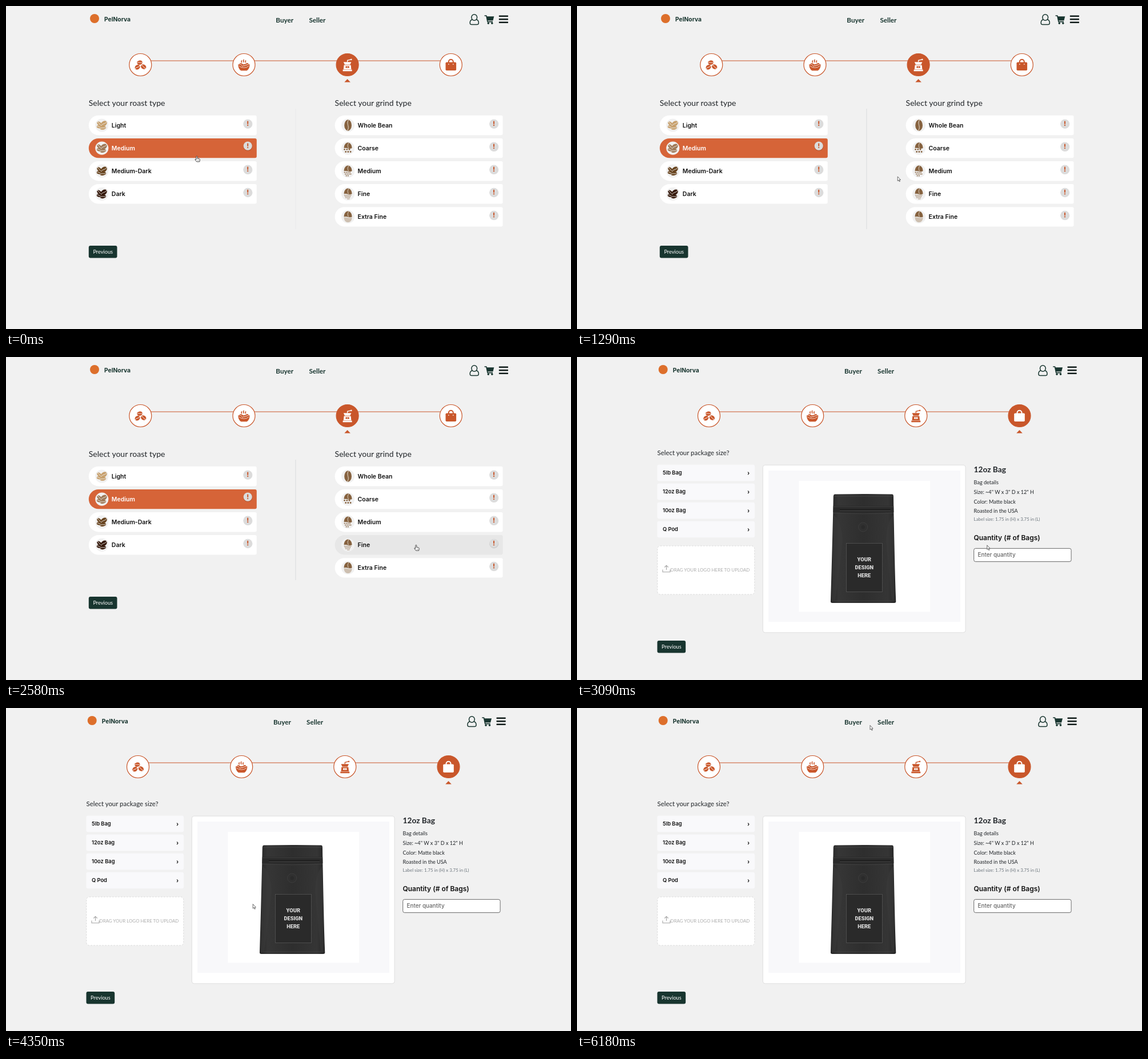
Write an HTML page that moves like this. It is 989 px wide and 566 px high and loops after 6.21 s.

```html
<!DOCTYPE html>
<html lang="en">
<head>
<meta charset="utf-8">
<title>Coffee order steps</title>
<style>
  html, body { margin: 0; width: 100%; height: 100%; overflow: hidden; background: #f1f1f1; }
  svg { display: block; width: 989px; height: 566px; }
  .lato { font-family: Lato, sans-serif; }
  .geo { font-family: Inter, sans-serif; }
  .heavy { font-family: Roboto, sans-serif; }
</style>
</head>
<body>
<svg id="stage" viewBox="0 0 989 566"></svg>
<script>
const LOOP = 6210, SWITCH = 2850, DIVIDER_IN = 330;
const ORANGE = '#c9572b', DARK = '#18352f', INK = '#212529';

const text = (x, y, size, str, o = {}) =>
  `<text class="${o.font || 'lato'}" x="${x}" y="${y}" font-size="${size}" font-weight="${o.weight || 400}"
    fill="${o.fill || INK}" text-anchor="${o.anchor || 'start'}">${str}</text>`;
const rect = (x, y, w, h, fill, r = 0, extra = '') =>
  `<rect x="${x}" y="${y}" width="${w}" height="${h}" rx="${r}" fill="${fill}" ${extra}/>`;
const circle = (x, y, r, fill, extra = '') =>
  `<circle cx="${x}" cy="${y}" r="${r}" fill="${fill}" ${extra}/>`;
const path = (d, fill, extra = '') => `<path d="${d}" fill="${fill}" ${extra}/>`;
const line = (d, color, w, extra = '') => path(d, 'none', `stroke="${color}" stroke-width="${w}" ${extra}`);
const at = (x, y, body) => `<g transform="translate(${x} ${y})">${body}</g>`;

function bean(x, y, rx, ry, angle, fill, gap = '#fff') {
  return `<g transform="translate(${x} ${y}) rotate(${angle})">
    <ellipse rx="${rx}" ry="${ry}" fill="${fill}"/>` +
    line(`M${-rx} 0C${-rx / 3} ${-ry * .6} ${rx / 3} ${ry * .6} ${rx} 0`, gap, .8) + '</g>';
}

const stepIcons = [
  c => bean(-5.2, 4, 4.9, 3.9, -35, c) + bean(-1.2, -4.2, 4.9, 3.8, -12, c) + bean(5.4, 3.2, 5, 3.9, 35, c),
  (c, gap) => path('M-10 -1.5Q-6 2.5 0 2.5Q6 2.5 10 -1.5C10.6 4 8 8 5 10H-5C-8 8 -10.6 4 -10 -1.5Z', c) +
    bean(-4.6, 0, 4.2, 2.8, 30, c, gap) + bean(4.6, 0, 4.2, 2.8, -30, c, gap) + bean(0, 1.4, 3.6, 2.6, -20, c, gap) +
    line('M-9 1.5Q-5 4.8 0 4.8T9 1.5', gap, .7) +
    line('M-3.5 -4Q-5.5 -6 -3.5 -8M0 -4.5Q-2 -7 0 -9.5M3.5 -4Q1.5 -6 3.5 -8', c, 1.4),
  (c, gap) => path('M-6.8 -5H6.8L4.6 -.6H-4.6ZM-6 .2H6L6.8 7.8H-6.8ZM-8 8.3H8V11H-8Z', c) +
    line('M0 -5V-8L6.5 -9.6', c, 1.3) + circle(6.8, -9.6, 1.2, c) +
    rect(-3.2, 2.2, 6.4, 3, gap, .5) + circle(0, 3.7, .7, c),
  c => rect(-9.3, -4.8, 18.6, 14.6, c, 1.8) +
    line('M-4 -2V-5.5A4 4 0 0 1 4 -5.5V-2', c, 2) +
    circle(-4, -1.3, .9, '#fff', 'opacity=".8"') + circle(4, -1.3, .9, '#fff', 'opacity=".8"')
];

function header(active) {
  const xs = [235.3, 416.5, 597.6, 778.8];
  const steps = xs.map((x, i) => {
    const on = i === active;
    const fg = on ? '#fff' : ORANGE, bg = on ? ORANGE : '#fff';
    return circle(x, 103, 19.5, bg, `stroke="${ORANGE}" stroke-width="1.2"`) + at(x, 103.3, stepIcons[i](fg, bg));
  }).join('');
  const ax = xs[active];
  return circle(155, 22, 8, '#dd6f2b') +
    text(172, 27.3, 10.3, 'PelNorva', { font: 'geo', weight: 700, fill: DARK }) +
    text(472.3, 29.2, 11.7, 'Buyer', { weight: 700, fill: DARK }) +
    text(530.4, 29.2, 11.7, 'Seller', { weight: 700, fill: DARK }) +
    line('M819.7 14.8A4.9 5.2 0 0 1 819.7 25.2A4.9 5.2 0 0 1 819.7 14.8M816 23.8C812.5 25 812 28 812.3 30.5Q812.5 32.5 815 32.5H824.5Q827 32.5 827.2 30.5C827.5 28 827 25 823.5 23.8', DARK, 1.5) +
    line('M837.5 17H840.8L843 27.6H852', DARK, 1.6) +
    path('M841 18.2H854.3L852.4 25.4H842.5Z', DARK) + circle(844.3, 30.3, 1.7, DARK) + circle(850.8, 30.3, 1.7, DARK) +
    [16.4, 21.9, 27.4].map(y => rect(862.8, y, 16.2, 2.5, '#111c1a', .6)).join('') +
    line(`M${xs[0]} 96H${xs[3]}`, ORANGE, 1.2) + steps +
    path(`M${ax - 5.3} 133.4L${ax} 128L${ax + 5.3} 133.4Z`, ORANGE);
}

const previous = (x, y) => rect(x, y, 49.7, 21.4, DARK, 3) +
  text(x + 24.9, y + 14.2, 9.2, 'Previous', { anchor: 'middle', fill: '#fff' });

const roastIcon = shade => () =>
  bean(-4.6, -3, 4.4, 2.9, 42, shade, '#f0f0f0') + bean(3.4, -2.6, 6.2, 4.3, -38, shade, '#f0f0f0') +
  bean(-4.8, 2.6, 4.4, 2.8, 12, shade, '#f0f0f0') + bean(2, 4.6, 5.6, 3.1, -12, shade, '#f0f0f0');

const BROWN = '#86623f';
const grounds = (step, r) => () => {
  let dots = '';
  for (let row = 0, y = 2.2; y < 9.6; y += step, row++)
    for (let x = -6 + (row % 2) * step / 2; x <= 6.2; x += step)
      if (x * x / 46 + y * y / 92 < 1) dots += circle(x.toFixed(1), y.toFixed(1), r, BROWN);
  return halfBean() + dots;
};
const halfBean = () => path('M-7 0C-7 -6 -3.5 -9.8 0 -9.8S7 -6 7 0Q3.5 1.6 0 .4T-7 0Z', BROWN) +
  line('M1.5 -9.5Q-2 -5 1 0', '#e6dccf', .9);
const powder = () => path('M-7 1Q-3.5 .6 0 1.6T7 1C7 6 4 9.6 0 9.6S-7 6 -7 1Z', '#cdbfb0') + halfBean();
const wholeBean = () => `<ellipse rx="6.4" ry="9.7" fill="${BROWN}"/>` +
  line('M1.2 -9.6C-4 -3 4 2 -1.2 9.6', '#efe6da', 1);

const ROW_W = 294, ROW_H = 34.4;
const rowY = i => 191.8 + i * 40.1;

function optionRow(x, i, label, icon, picked, id = '') {
  const y = rowY(i), mid = y + ROW_H / 2;
  const shape = `M${x + 17.2} ${y}h${ROW_W - 20.2}q3 0 3 3v${ROW_H - 6}q0 3 -3 3h${20.2 - ROW_W}a17.2 17.2 0 0 1 0 ${-ROW_H}Z`;
  const by = mid - (picked ? 4 : 3);
  return path(shape, picked ? '#d66438' : '#fff', id && `id="${id}"`) +
    circle(x + 23, mid, 11.6, '#f1f1f1') + at(x + 23, mid, icon()) +
    text(x + 40, mid + 3.6, 10.5, label, { font: 'geo', weight: 600, fill: picked ? '#fff' : '#111' }) +
    circle(x + 278.6, by + .9, 8, '#000', 'opacity=".14"') + circle(x + 278.4, by, 7.6, '#dcdcdc') +
    rect(x + 277.4, by - 4.6, 2, 5.6, ORANGE, .8) + circle(x + 278.4, by + 3, 1.15, ORANGE);
}

const LEFT = 144.8, RIGHT = 575.6;
const roasts = [['Light', '#c7a06d'], ['Medium', '#9f7a58'], ['Medium-Dark', '#68441f'], ['Dark', '#35190b']];
const grinds = [['Whole Bean', wholeBean], ['Coarse', grounds(4.2, 1.4)], ['Medium', grounds(3.1, 1)],
  ['Fine', grounds(2.2, .7)], ['Extra Fine', powder]];

const grindPage = header(2) +
  text(LEFT, 174.8, 14, 'Select your roast type') + text(RIGHT, 174.8, 14, 'Select your grind type') +
  rect(506.4, 180, 1, 211, '#d9dbdc', 0, 'id="divider"') +
  roasts.map(([name, shade], i) => optionRow(LEFT, i, name, roastIcon(shade), i === 1)).join('') +
  grinds.map(([name, icon], i) => optionRow(RIGHT, i, name, icon, false, 'grind' + i)).join('') +
  previous(144.8, 420);

const pouch =
  path('M451 240.6Q501 239.6 552 240.6Q554 241 554 244L554.4 274C555.4 320 556.4 380 558.3 428.5Q558.2 431 555 431H447Q444 431 444 428.5C445.6 380 447 320 448.2 274L448.8 244Q449 241 451 240.6Z', 'url(#matte)') +
  path('M448.7 261H554.2L554.4 272Q501 275 448.4 272Z', '#2a2a2a') +
  line('M449 262.5H554M449 273.5Q501 276 554 273.5', '#474747', .7) +
  line('M460 267.6H549', '#171717', 1.3) + line('M460 269.2H549', '#505050', .7) +
  line('M450 244H553', '#4a4a4a', .7) +
  circle(500.7, 298, 8, '#303030', 'stroke="#404040" stroke-width=".8"') + circle(500.7, 298, 3.2, '#2a2a2a') +
  path('M449 277Q462 286 465 320Q459 380 452 426L446 426Z', '#3b3b3b', 'opacity=".55"') +
  path('M554 277Q542 288 541 322Q546 380 551 426L556 426Z', '#3b3b3b', 'opacity=".55"') +
  line('M446 427.2H556.5', '#454545', .8) +
  rect(471.4, 326.4, 63, 85, '#2a2a2a', 0, 'stroke="#565656" stroke-width=".8"') +
  ['YOUR', 'DESIGN', 'HERE'].map((w, i) =>
    text(502.8, 357.9 + i * 14, 9.3, w, { font: 'heavy', weight: 900, anchor: 'middle', fill: '#dcdcdc' })).join('');

const details = [['Bag details', 223.4], ['Size: ~4" W x 3" D x 12" H', 240.4], ['Color: Matte black', 256.5], ['Roasted in the USA', 272.5]];

const packagePage = at(-4.3, 0, header(3)) +
  text(140.5, 172.4, 11.45, 'Select your package size?') +
  ['5lb Bag', '12oz Bag', '10oz Bag', 'Q Pod'].map((name, i) => {
    const y = 188.8 + i * 33;
    return rect(140.5, y, 170.6, 28.4, '#f9f9fb', 3) +
      text(150, y + 17, 9.3, name, { font: 'geo', weight: 600, fill: '#111' }) +
      line(`M299.2 ${y + 12.7}l1.7 2.3l-1.7 2.3`, '#111', 1.2);
  }).join('') +
  rect(140.8, 331, 170, 85, '#fff', 5, 'stroke="#dcdcdc" stroke-dasharray="3 2"') +
  line('M150 372.5V376.8H163V372.5M156.5 373V365.5M153.3 368.5L156.5 365.2L159.7 368.5', '#a4a4a4', 1.1) +
  text(163.6, 375.8, 7.95, 'DRAG YOUR LOGO HERE TO UPLOAD', { fill: '#adadad' }) +
  rect(325.3, 189.3, 354.8, 293.6, '#fff', 4, 'stroke="#dfdfdf"') +
  rect(335, 199, 336, 265, '#f8f8fa') + rect(388.4, 217, 229.6, 229.4, '#fff') + pouch +
  text(694.6, 202.4, 13.7, '12oz Bag', { weight: 700 }) +
  details.map(([s, y]) => text(694.6, y, 9.1, s)).join('') +
  text(694.6, 286.8, 7.9, 'Label size: 1.75 in (H) x 3.75 in (L)', { fill: '#6c757d' }) +
  text(694.4, 321, 12, 'Quantity (# of Bags)', { font: 'geo', weight: 600, fill: '#111' }) +
  rect(694.7, 335.4, 170.4, 23.2, '#fff', 3, 'stroke="#6b6b6b"') +
  text(701.5, 350, 9.9, 'Enter quantity', { font: 'geo', weight: 500, fill: '#666' }) +
  previous(140.5, 497);

const hand = path('M-1 .8Q-1 -.4 0 -.4T1 .8V3.6L4.6 4.4Q5.6 4.8 5.4 6L4.8 9.4H-.2L-3 5.8Q-3.2 4.6 -2 5L-1 5.8Z',
  '#fff', 'stroke="#333" stroke-width=".9" stroke-linejoin="round"') + line('M1.6 6V8M3.2 6V8', '#555', .5);
const arrow = path('M0 0V7.6L1.8 6L3 8.8L4.2 8.3L3 5.6H5.2Z', '#fff', 'stroke="#444" stroke-width=".8" stroke-linejoin="round"');

const $ = id => document.getElementById(id);
$('stage').innerHTML = `<defs><linearGradient id="matte">
    <stop offset="0" stop-color="#262626"/><stop offset=".12" stop-color="#363636"/>
    <stop offset=".5" stop-color="#2e2e2e"/><stop offset=".88" stop-color="#353535"/><stop offset="1" stop-color="#242424"/>
  </linearGradient></defs>` +
  rect(0, 0, 989, 566, '#f1f1f1') +
  `<g id="grindPage">${grindPage}</g><g id="packagePage">${packagePage}</g>
   <g id="cursor"><g id="hand">${hand}</g><g id="arrow">${arrow}</g></g>`;

// Cursor tip: time, x, y
const track = [
  [0, 334, 263.5], [900, 334, 263.5], [1600, 720.8, 323.8], [1740, 720.8, 323.8],
  [1890, 717.8, 329.8], [3150, 717.8, 329.8], [4250, 432.2, 343.6], [4500, 432.2, 343.6],
  [5900, 513, 30.4], [LOOP, 513, 30.4]
];
const ease = p => p * p * (3 - 2 * p);

function cursorAt(t) {
  const i = track.findIndex(k => k[0] > t);
  const [t0, x0, y0] = track[i - 1], [t1, x1, y1] = track[i];
  const p = ease((t - t0) / (t1 - t0));
  return [x0 + (x1 - x0) * p, y0 + (y1 - y0) * p];
}

const overRow = (x, y, left, i) => x >= left && x <= left + ROW_W && y >= rowY(i) && y <= rowY(i) + ROW_H;
const show = (id, on) => $(id).setAttribute('visibility', on ? 'visible' : 'hidden');

function draw(t) {
  const first = t < SWITCH, [x, y] = cursorAt(t);
  $('grindPage').style.display = first ? '' : 'none';
  $('packagePage').style.display = first ? 'none' : '';
  $('divider').setAttribute('opacity', t < DIVIDER_IN ? .3 : 1);
  const hovered = grinds.findIndex((_, i) => overRow(x, y, RIGHT, i));
  grinds.forEach((_, i) => $('grind' + i).setAttribute('fill', i === hovered ? '#e7e7e7' : '#fff'));
  const link = first && (hovered >= 0 || roasts.some((_, i) => overRow(x, y, LEFT, i)));
  show('hand', link);
  show('arrow', !link);
  $('cursor').setAttribute('transform', `translate(${x.toFixed(2)} ${y.toFixed(2)})`);
}

const start = performance.now();
function tick() {
  draw((performance.now() - start) % LOOP);
  requestAnimationFrame(tick);
}
tick();
</script>
</body>
</html>
```
